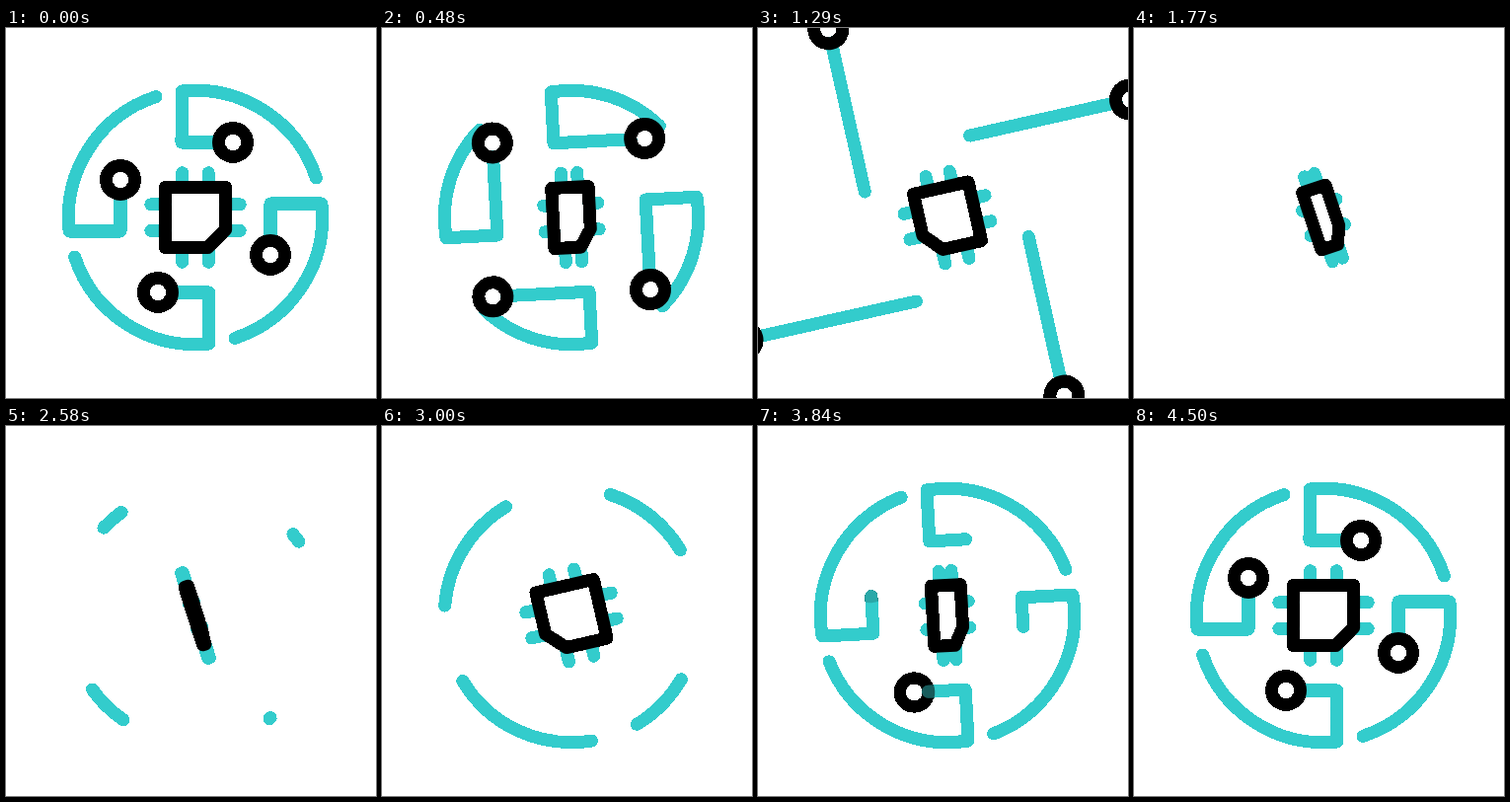
Recreate the animation shown at these times as an HTML page with a canvas. Size 375 px wide and 375 px high, loop 4.83 s.

```html
<!DOCTYPE html>
<html lang="en">
<head>
<meta charset="utf-8">
<title>Chip</title>
<style>
  html, body { margin: 0; width: 100%; height: 100%; overflow: hidden; background: #fff; }
  svg { position: absolute; }
  canvas { display: block; filter: url(#hard); }
</style>
</head>
<body>
<svg width="0" height="0">
  <filter id="hard" x="0" y="0" width="1" height="1" color-interpolation-filters="sRGB">
    <feComponentTransfer><feFuncA type="discrete" tableValues="0 1"/></feComponentTransfer>
  </filter>
</svg>
<canvas width="375" height="375"></canvas>
<script>
const ctx = document.querySelector('canvas').getContext('2d');
const TEAL = '#33cccc', BLACK = '#000';
const LOOP = 4830, END = 4500, REDRAW = 2170;
const RAD = Math.PI / 180;

const RADIUS = 128.7, SIDE = 52, NODE = 14.5;
const ARC_FROM = -18.1 * RAD, ARC_TO = -96.2 * RAD;
const BEND = RADIUS * (ARC_FROM - ARC_TO) + SIDE;   // length up to the inner corner
const ARM = BEND + SIDE - NODE;

// Time, tilt and spin in degrees
const POSES = [
  [0, 0, 0], [900, -7.8, 131], [1770, -18.5, 293.5], [2160, -20, 367], [2580, -17.5, 446.3],
  [3420, -8, 606], [3840, -3.2, 659], [END, 0, 720]
];
const HEAD_REACH = [113.6, 103.4, 100, 97.3];
const TAIL_REACH = [161, 157.8, 155.8, 154];

const clamp = x => Math.min(1, Math.max(0, x));
const ease = x => (1 - Math.cos(Math.PI * clamp(x))) / 2;

function slope(i, k) {
  const a = POSES[i - 1], b = POSES[i + 1];
  return a && b ? (b[k] - a[k]) / (b[0] - a[0]) : 0;
}

// Smooth curve through the poses
function pose(t, k) {
  const i = Math.max(0, POSES.findIndex(p => p[0] >= t) - 1);
  const a = POSES[i], b = POSES[i + 1], span = b[0] - a[0];
  const u = (t - a[0]) / span, v = 1 - u;
  return a[k] * v * v * (1 + 2 * u) + b[k] * u * u * (3 - 2 * u)
    + span * u * v * (slope(i, k) * v - slope(i + 1, k) * u);
}

function stroke(color, trace) {
  ctx.strokeStyle = color;
  ctx.beginPath();
  trace();
  ctx.stroke();
}

function drawArm(i, t) {
  let from = 0, to, reach = SIDE, alpha = 1;
  if (t < REDRAW) {
    reach += HEAD_REACH[i] * (t / 900) ** 1.45;
    from = TAIL_REACH[i] * (t / 900) ** 1.638;
    to = BEND + reach - NODE;
  } else {
    const local = t - 2178 - 110 * i;
    if (local <= 0) return;
    to = ARM * ease(local / 1500);
    alpha = clamp((local - 1500) / 300);
  }

  ctx.save();
  ctx.rotate((180 + 90 * i) * RAD);
  if (to > from) {
    ctx.setLineDash([to - from, 5000]);
    ctx.lineDashOffset = -from;
    stroke(TEAL, () => {
      ctx.arc(0, 0, RADIUS, ARC_FROM, ARC_TO, true);
      ctx.lineTo(-14, -76);
      ctx.lineTo(1500, -76);
    });
    ctx.setLineDash([]);
  }
  ctx.globalAlpha = alpha;
  stroke(BLACK, () => ctx.arc(reach - 14, -76, NODE, 0, 2 * Math.PI));
  ctx.restore();
}

function drawChip(spin) {
  const flip = Math.cos(spin * RAD);
  const line = points => points.forEach(([x, y]) => ctx.lineTo(x * flip, y));
  for (const side of [-1, 1]) {
    for (const offset of [-13.3, 13.3]) {
      stroke(TEAL, () => line([[offset, side * 31], [offset, side * 45.2]]));
      stroke(TEAL, () => line([[side * 31, offset], [side * 45.2, offset]]));
    }
  }
  stroke(BLACK, () => {
    line([[-30.6, -30.6], [30.6, -30.6], [30.6, 12.5], [12.5, 30.6], [-30.6, 30.6]]);
    ctx.closePath();
  });
}

function frame(now) {
  const t = Math.min(now % LOOP, END);
  ctx.clearRect(0, 0, 375, 375);
  ctx.save();
  ctx.translate(192, 192);
  ctx.rotate(pose(t, 1) * RAD);
  ctx.lineWidth = 13;
  ctx.lineCap = ctx.lineJoin = 'round';
  for (let i = 0; i < 4; i++) drawArm(i, t);
  drawChip(pose(t, 2));
  ctx.restore();
  requestAnimationFrame(() => frame(performance.now() - start));
}

const start = performance.now();
frame(0);
</script>
</body>
</html>
```
